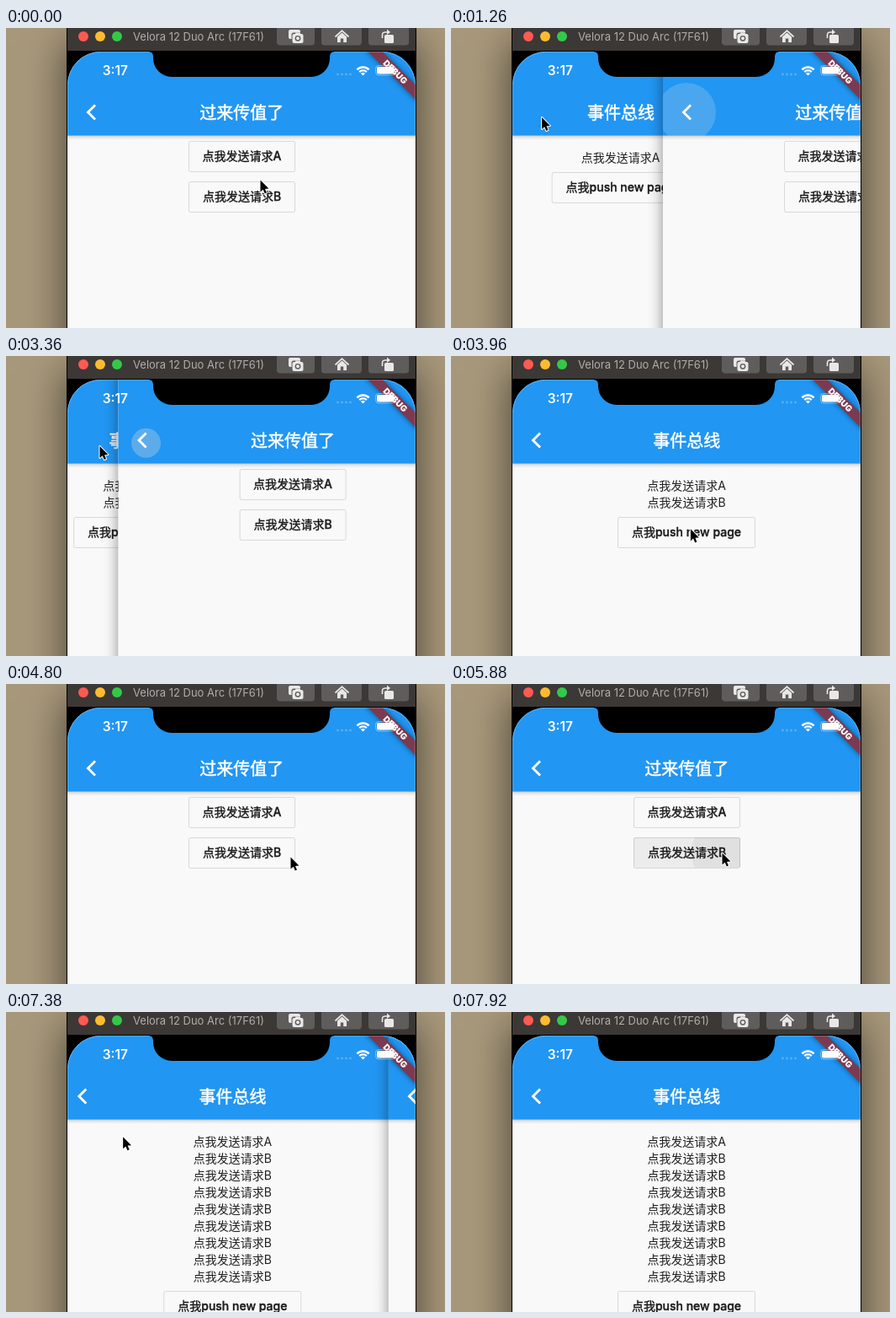
Recreate the animation shown at these times as an HTML page with a canvas. Size 522 px wide and 356 px high, loop 8100 ms.

```html
<!DOCTYPE html>
<html lang="zh">
<head>
<meta charset="utf-8">
<title>事件总线</title>
<style>
html, body { margin: 0; width: 522px; height: 356px; overflow: hidden; background: #a8987b; }
canvas { display: block; }
</style>
</head>
<body>
<canvas id="stage" width="522" height="356"></canvas>
<script>
const ctx = document.getElementById('stage').getContext('2d');
const LOOP = 8100, TICK = 60;
const LEFT = 73, RIGHT = 487, TOP = 28, WIDTH = RIGHT - LEFT, MID = 280;
const FONT = 'Inter, "Noto Sans CJK SC", "Noto Sans CJK", sans-serif';
const INK = 'rgba(0,0,0,.87)', BLUE = '#2196f3';
const SLIDE = 400;

// page transitions: start time and direction
const slides = [
  { at: 1193.3, pop: true }, { at: 1886 }, { at: 3337.6, pop: true },
  { at: 4166 }, { at: 7178, pop: true }
];

// pointer stops: time, x, y
const path = [
  [0, 302, 180], [110, 302, 180], [310, 290, 152], [560, 290, 152],
  [1100, 107.5, 105.5], [1270, 107.5, 105.5], [1700, 288, 186], [2240, 288, 186],
  [2460, 285, 195], [2720, 285, 195], [3150, 111, 106.5], [3370, 111, 106.5],
  [4030, 290, 208], [4370, 290, 208], [4770, 338, 205], [5230, 338, 205],
  [5800, 322, 200], [6340, 322, 200], [6890, 115, 114], [7010, 111, 108],
  [7220, 111, 108], [7860, 288, 362]
];

const presses = [
  ['A', 330], ['B', 2500], ['B', 4860], ['B', 5070], ['B', 5410],
  ['B', 5610], ['B', 5810], ['B', 6010], ['B', 6230],
  ['push', 1855], ['push', 4135],
  ['back', 1160], ['back', 3310], ['back', 7150]
].map(([key, at]) => ({ key, at }));

const clamp = v => Math.max(0, Math.min(1, v));
const mix = (a, b, k) => a + (b - a) * k;

function bezier(x1, y1, x2, y2) {
  const f = (a, b, s) => 3 * (1 - s) * (1 - s) * s * a + 3 * (1 - s) * s * s * b + s * s * s;
  return x => {
    let lo = 0, hi = 1;
    for (let i = 0; i < 24; i++) {
      const s = (lo + hi) / 2;
      if (f(x1, x2, s) < x) lo = s; else hi = s;
    }
    return f(y1, y2, (lo + hi) / 2);
  };
}
const pushCurve = bezier(.35, .91, .33, .97);
const popCurve = bezier(.67, .03, .65, .09);

// share of the stage covered by the upper page
function coverage(t) {
  let value = 1;
  for (const s of slides) {
    if (t < s.at) break;
    const k = clamp((t - s.at) / SLIDE);
    if (k === 1) value = s.pop ? 0 : 1;
    else value = s.pop ? popCurve(1 - k) : pushCurve(k);
  }
  return value;
}

function pointer(t) {
  for (let i = 1; i < path.length; i++) {
    const [t0, x0, y0] = path[i - 1], [t1, x1, y1] = path[i];
    if (t < t1) {
      const k = clamp((t - t0) / (t1 - t0)), e = k * k * (3 - 2 * k);
      return [mix(x0, x1, e), mix(y0, y1, e)];
    }
  }
  return path[path.length - 1].slice(1);
}

function text(str, x, y, size, weight, color, align = 'center') {
  ctx.font = `${weight} ${size}px ${FONT}`;
  ctx.textAlign = align;
  ctx.fillStyle = color;
  ctx.fillText(str, x, y);
}

// the CJK face has no medium weight, so a hairline thickens it
function mediumText(str, x, y, size, color) {
  text(str, x, y, size, 500, color);
  ctx.lineWidth = size * .026;
  ctx.strokeStyle = color;
  ctx.strokeText(str, x, y);
}

function box(x, y, w, h, r, color) {
  ctx.beginPath();
  ctx.roundRect(x, y, w, h, r);
  ctx.fillStyle = color;
  ctx.fill();
}

function frame(x, y, w, h, r, color) {
  ctx.beginPath();
  ctx.roundRect(x, y, w, h, r);
  ctx.lineWidth = 1;
  ctx.strokeStyle = color;
  ctx.stroke();
}

function disc(x, y, r, color) {
  ctx.beginPath();
  ctx.arc(x, y, r, 0, 7);
  ctx.fillStyle = color;
  ctx.fill();
}

function line(points, width, color, close) {
  ctx.beginPath();
  points.forEach(([x, y]) => ctx.lineTo(x, y));
  if (close) ctx.closePath();
  ctx.lineWidth = width;
  ctx.strokeStyle = color;
  ctx.stroke();
}

function activePresses(key, t) {
  return presses.filter(p => p.key === key && t >= p.at && t < p.at + 220);
}

const pressFade = age => 1 - clamp((age - 50) / 170);

function button(key, label, x, y, w, t) {
  ctx.save();
  ctx.beginPath();
  ctx.roundRect(x, y, w, 36, 2);
  ctx.clip();
  for (const p of activePresses(key, t)) {
    const age = t - p.at;
    const [px, py] = pointer(p.at);
    ctx.globalAlpha = pressFade(age);
    ctx.fillStyle = 'rgba(188,188,188,.25)';
    ctx.fillRect(x, y, w, 36);
    disc(px, py, 12 + age * .35, 'rgba(200,200,200,.4)');
  }
  ctx.restore();
  frame(x + .5, y + .5, w - 1, 36, 2, 'rgba(0,0,0,.13)');
  mediumText(label, x + w / 2, y + 23.3, 14, INK);
}

function pageBase(title) {
  ctx.fillStyle = '#f9f9f9';
  ctx.fillRect(LEFT, TOP, WIDTH, 330);
  const g = ctx.createLinearGradient(0, 127, 0, 133);
  g.addColorStop(0, 'rgba(0,0,0,.26)');
  g.addColorStop(.35, 'rgba(0,0,0,.1)');
  g.addColorStop(1, 'rgba(0,0,0,0)');
  ctx.fillStyle = g;
  ctx.fillRect(LEFT, 127, WIDTH, 6);
  ctx.fillStyle = BLUE;
  ctx.fillRect(LEFT, TOP, WIDTH, 99.5);
  mediumText(title, MID + .3, 107.6, 20, '#fff');
}

function chevron() {
  line([[106, 91.5], [97.5, 100], [106, 108.5]], 2.9, '#fff');
}

function listPage(t) {
  pageBase('事件总线');
  chevron();
  const sent = presses.filter(p => p.key.length === 1 && p.at <= t);
  sent.forEach((p, i) => text('点我发送请求' + p.key, MID, 159.3 + i * 20, 14, 400, INK));
  button('push', '点我push new page', 198, 151 + sent.length * 20, 164, t);
}

function sendPage(t) {
  pageBase('过来传值了');
  for (const p of activePresses('back', t)) {
    const age = t - p.at, k = clamp(age / 100);
    const [px, py] = pointer(p.at);
    ctx.save();
    ctx.beginPath();
    ctx.rect(LEFT, TOP, WIDTH, 99.5);
    ctx.clip();
    ctx.globalAlpha = pressFade(age);
    disc(mix(px, 101, k), mix(py, 100, k), 35 * k, 'rgba(205,215,220,.34)');
    ctx.restore();
  }
  chevron();
  button('A', '点我发送请求A', 217, 134, 127, t);
  button('B', '点我发送请求B', 217, 182, 127, t);
}

function edgeShadow(x) {
  const w = 20, g = ctx.createLinearGradient(x - w, 0, x, 0);
  [[0, 0], [.3, .016], [.6, .07], [1, .22]].forEach(([k, a]) =>
    g.addColorStop(k, `rgba(0,0,0,${a})`));
  ctx.fillStyle = g;
  ctx.fillRect(x - w, TOP, w, 330);
}

function banner() {
  ctx.save();
  ctx.translate(RIGHT, TOP);
  ctx.rotate(Math.PI / 4);
  ctx.shadowColor = 'rgba(0,0,0,.5)';
  ctx.shadowBlur = 6;
  ctx.fillStyle = '#7c3a50';
  ctx.fillRect(-44, 28, 88, 12);
  ctx.shadowColor = 'transparent';
  text('DEBUG', 0, 37.7, 10.2, 900, '#fff');
  ctx.restore();
}

function statusBar() {
  text('3:17', 129.8, 56.4, 15.5, 600, '#fff');
  for (let i = 0; i < 4; i++) disc(394.5 + i * 5, 55, 1.4, 'rgba(255,255,255,.26)');

  ctx.save();
  ctx.beginPath();
  ctx.moveTo(424.5, 56.5);
  ctx.arc(424.5, 56.5, 12, -Math.PI * .75, -Math.PI * .25);
  ctx.clip();
  disc(424.5, 56.5, 3.4, '#fff');
  ctx.strokeStyle = '#fff';
  ctx.lineWidth = 2.3;
  for (const r of [6.2, 10]) {
    ctx.beginPath();
    ctx.arc(424.5, 56.5, r, 0, 7);
    ctx.stroke();
  }
  ctx.restore();

  frame(439.5, 44.5, 23.5, 11.5, 3.5, 'rgba(255,255,255,.4)');
  box(441, 46, 20.5, 8.5, 2, '#fff');
  box(464.5, 48.5, 1.5, 4, 1, 'rgba(255,255,255,.4)');
}

function notch() {
  ctx.beginPath();
  ctx.moveTo(169, TOP);
  ctx.quadraticCurveTo(175, TOP, 175, 34);
  ctx.arcTo(175, 58, 197, 58, 22);
  ctx.arcTo(385, 58, 385, 36, 22);
  ctx.lineTo(385, 34);
  ctx.quadraticCurveTo(385, TOP, 391, TOP);
  ctx.fillStyle = '#000';
  ctx.fill();
}

function titleBar() {
  ctx.fillStyle = '#3b3836';
  ctx.fillRect(LEFT, 0, WIDTH, 27);
  ['#ff5a52', '#fdbc30', '#34c84a'].forEach((c, i) => disc(92 + i * 20, 10, 6, c));
  text('Velora 12 Duo Arc (17F61)', 151, 14.8, 13, 400, '#b0adab', 'left');

  const pale = '#e9e8e7', dark = '#5f5d5b';
  [[322, 45], [375, 48], [431, 48]].forEach(([x, w]) => box(x, -8, w, 28.5, 4, dark));

  // screenshot
  box(336, 2, 14, 11, 2, pale);
  box(339.5, 5.5, 15, 13, 2.5, dark);
  box(340.5, 7, 13, 11, 2, pale);
  box(344, 5.5, 6, 3, 1, pale);
  disc(347, 12.3, 3.4, dark);
  disc(347, 12.3, 2, pale);

  // home
  line([[391.5, 10.5], [399.5, 3.2], [407.5, 10.5]], 1.7, pale);
  ctx.beginPath();
  [[394, 10.5], [399.5, 5.5], [405, 10.5], [405, 17], [401.2, 17],
   [401.2, 12.5], [397.8, 12.5], [397.8, 17], [394, 17]].forEach(p => ctx.lineTo(...p));
  ctx.fillStyle = pale;
  ctx.fill();

  // rotate
  box(450, 8, 11, 10, 1.5, pale);
  ctx.beginPath();
  ctx.moveTo(447.5, 12);
  ctx.lineTo(447.5, 8);
  ctx.quadraticCurveTo(447.5, 5, 451, 5);
  ctx.lineTo(454, 5);
  ctx.lineWidth = 1.6;
  ctx.strokeStyle = pale;
  ctx.stroke();
  ctx.beginPath();
  [[453, 1.5], [457, 5], [453, 8]].forEach(p => ctx.lineTo(...p));
  ctx.fillStyle = pale;
  ctx.fill();
}

function drawPointer([x, y]) {
  ctx.save();
  ctx.translate(x, y);
  const shape = [[.5, .5], [.5, 14.6], [3.7, 11.7], [5.8, 16.6], [8, 15.6], [6, 10.9], [10.4, 10.6]];
  ctx.lineJoin = 'round';
  line(shape, 2, '#fff', true);
  ctx.fillStyle = '#000';
  ctx.fill();
  ctx.restore();
}

function shifted(dx, draw, t) {
  ctx.save();
  ctx.translate(dx, 0);
  draw(t);
  ctx.restore();
}

function draw(t) {
  ctx.fillStyle = '#a8987b';
  ctx.fillRect(0, 0, 522, 356);
  ctx.save();
  ctx.shadowColor = 'rgba(0,0,0,.58)';
  ctx.shadowBlur = 46;
  ctx.shadowOffsetY = 22;
  ctx.fillStyle = '#000';
  ctx.fillRect(LEFT - 1, -4, WIDTH + 2, 700);
  ctx.restore();
  titleBar();

  ctx.save();
  ctx.beginPath();
  ctx.roundRect(LEFT, TOP, WIDTH, 500, 40);
  ctx.clip();
  const shown = coverage(t), offset = WIDTH * (1 - shown);
  if (shown < 1) {
    shifted(-WIDTH * shown / 3, listPage, t);
    if (shown > 0) edgeShadow(LEFT + offset);
  }
  if (shown > 0) shifted(offset, sendPage, t);
  banner();
  statusBar();
  frame(LEFT + .5, TOP + .5, WIDTH - 1, 500, 39.5, 'rgba(255,255,255,.2)');
  ctx.restore();
  notch();
  drawPointer(pointer(t));
}

const start = performance.now();
function tick() {
  const t = (performance.now() - start) % LOOP;
  draw(Math.floor(t / TICK) * TICK);
  requestAnimationFrame(tick);
}
tick();
</script>
</body>
</html>
```
